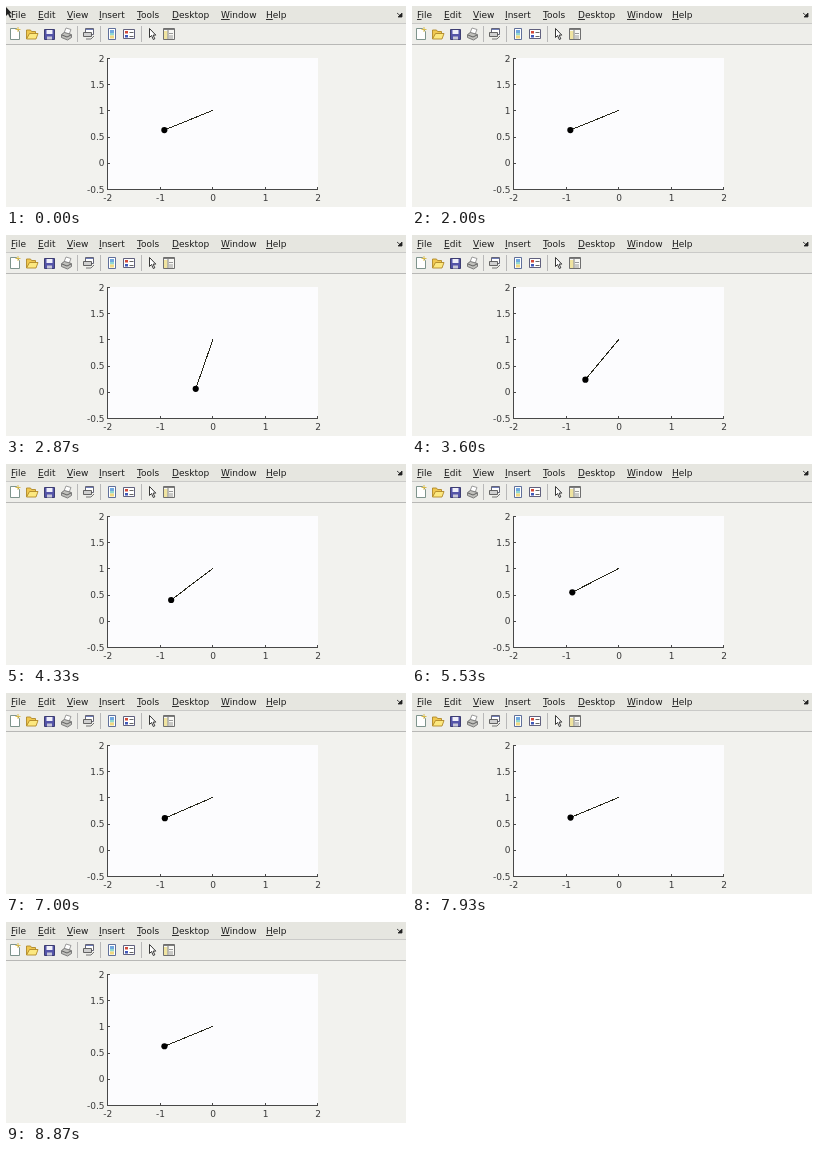
These frames come from a looping animation (400x201 px, 8990 ms). An HTML page:

```html
<!DOCTYPE html>
<html lang="en">
<head>
<meta charset="utf-8">
<title>Pendulum step response</title>
<style>
html, body { margin: 0; width: 100%; height: 100%; overflow: hidden; background: #f2f2ee; }
svg { display: block; width: 100vw; height: 100vh; }
text { font: 9px "DejaVu Sans", sans-serif; }
.menu { fill: #1c1c1c; }
.ticks { fill: #383838; }
.u { text-decoration: underline; }
</style>
</head>
<body>
<svg viewBox="0 0 400 201">
  <rect width="400" height="201" fill="#f2f2ee"/>
  <rect width="400" height="17" fill="#e6e6e0"/>
  <rect y="17" width="400" height="1" fill="#cacac8"/>
  <rect y="18" width="400" height="20" fill="#eeeeea"/>
  <rect y="38" width="400" height="1" fill="#b8b8b6"/>
  <g id="menu" class="menu"></g>
  <path d="M391 7l3 2.5M396 7v4h-4z" stroke="#222" fill="#222" stroke-width=".8"/>

  <g stroke-width=".9" stroke-linejoin="round">
    <path d="M4.500 22.500h6l3 3v8h-9z" fill="#fff" stroke="#708880"/>
    <path d="M12 21v5M9.500 23.500h5" stroke="#d8b840"/>
    <path d="M20.500 33V24h4l1 1.500h4V28" fill="#f0c850" stroke="#b08828"/>
    <path d="M20.500 33l3-5.500h8.500L30 33z" fill="#fce880" stroke="#b08828"/>
    <path d="M38.500 23.500h10v10h-10z" fill="#5454a8" stroke="#333368"/>
    <path d="M40.500 24h6v4h-6z" fill="#f0f0fa"/>
    <path d="M41 30.500h5v3h-5z" fill="#c8c8d8"/>
    <path d="M58 27l2-5 5 1.500-2 5" fill="#fff" stroke="#909090"/>
    <path d="M55.500 28.500l3-2 7 2v3l-4 2.500-6-2.500z" fill="#c0c0bc" stroke="#707070"/>
    <path d="M56 29l5 2 4-2" fill="none" stroke="#555"/>
    <path d="M79.500 22.500h8v6h-8z" fill="#fff" stroke="#555568"/>
    <path d="M80 23.500h7" stroke="#6070b0"/>
    <path d="M77.500 26.500h8v4h-8z" fill="#d0d0d0" stroke="#555"/>
    <path d="M80 33h5l3-3" fill="none" stroke="#666"/>
    <path d="M102.500 22.500h7v11h-7z" fill="#fff" stroke="#506090"/>
    <path d="M104 24h4v3h-4z" fill="#70a8e0"/>
    <path d="M104 27h4v2.500h-4z" fill="#90d8d0"/>
    <path d="M104 29.500h4v3h-4z" fill="#f0d880"/>
    <path d="M117.500 23.500h11v9h-11z" fill="#fff" stroke="#505070"/>
    <path d="M119 25h3v2.500h-3z" fill="#d04838"/>
    <path d="M119 29h3v2.500h-3z" fill="#4058b8"/>
    <path d="M123.500 26.500h4m-4 4h4" stroke="#555"/>
    <path d="M143.500 22.500v9l2-2 1.800 4 1.500-.7-1.700-3.700h2.700z" fill="#fff" stroke="#222"/>
    <path d="M157.500 22.500h11v11h-11z" fill="#f8f8f4" stroke="#606060"/>
    <path d="M158 25h3.500v8H158z" fill="#f0e4a0"/>
    <path d="M157 23.500h12M162 24v9" stroke="#707070"/>
    <path d="M163 27.500h4m-4 2.500h4m-4 2h4" stroke="#909090"/>
  </g>
  <path d="M71.500 20v16M94.500 20v16M135.500 20v16" stroke="#b8b8b8"/>

  <rect x="102" y="52" width="210" height="131" fill="#fcfcfe"/>
  <path id="axes" fill="none" stroke="#484848" shape-rendering="crispEdges"/>
  <g id="labels" class="ticks"></g>
  <line id="rod" x1="207" y1="104.300" stroke="#28281c" shape-rendering="crispEdges"/>
  <circle id="bob" r="3.100"/>
  <path id="cursor" d="M0 1v9l2-2 2 4 1.500-1-2-3.500H6z" fill="#222"/>
</svg>
<script>
const LOOP = 8990, FRAME = 1000 / 15, START = 31;
const REST = 67.9 * Math.PI / 180, SLOW = 1080, FAST = 510;
const PIVOT = { x: 207, y: 104.3 }, UNIT = 52.5;
const byId = id => document.getElementById(id);

const items = { File: 5, Edit: 32, View: 61, Insert: 93, Tools: 131, Desktop: 166, Window: 215, Help: 260 };
byId("menu").innerHTML = Object.entries(items).map(([name, x]) =>
  `<text x="${x}" y="12"><tspan class="u">${name[0]}</tspan>${name.slice(1)}</text>`).join("");

let axes = "M101.5 52V183.5H312", labels = "";
const label = (x, y, anchor, value) =>
  labels += `<text x="${x}" y="${y}" text-anchor="${anchor}">${value}</text>`;
for (let i = 0; i < 5; i++) {
  const x = 101.5 + i * 52.6;
  axes += `M${x} 183v-2`;
  label(x + 0.3, 195, "middle", i - 2);
}
for (let i = 0; i < 6; i++) {
  const y = 52.5 + i * 26.2;
  axes += `M102 ${y}h2`;
  label(98.5, y + 3, "end", 2 - i / 2);
}
byId("axes").setAttribute("d", axes);
byId("labels").innerHTML = labels;

// Overdamped second-order step response, from hanging to the rest angle
function angleAt(ms) {
  const left = (SLOW * Math.exp(-ms / SLOW) - FAST * Math.exp(-ms / FAST)) / (SLOW - FAST);
  return REST * (1 - left);
}

function draw(now) {
  const step = Math.floor((now % LOOP + 5) / FRAME);
  const angle = step < START ? REST : angleAt((step - START) * FRAME);
  const x = PIVOT.x - UNIT * Math.sin(angle), y = PIVOT.y + UNIT * Math.cos(angle);
  byId("rod").setAttribute("x2", x);
  byId("rod").setAttribute("y2", y);
  byId("bob").setAttribute("cx", x);
  byId("bob").setAttribute("cy", y);
  byId("cursor").style.display = step < 1 ? "" : "none";
}

const begin = performance.now();
function tick() {
  draw(performance.now() - begin);
  requestAnimationFrame(tick);
}
tick();
</script>
</body>
</html>
```
